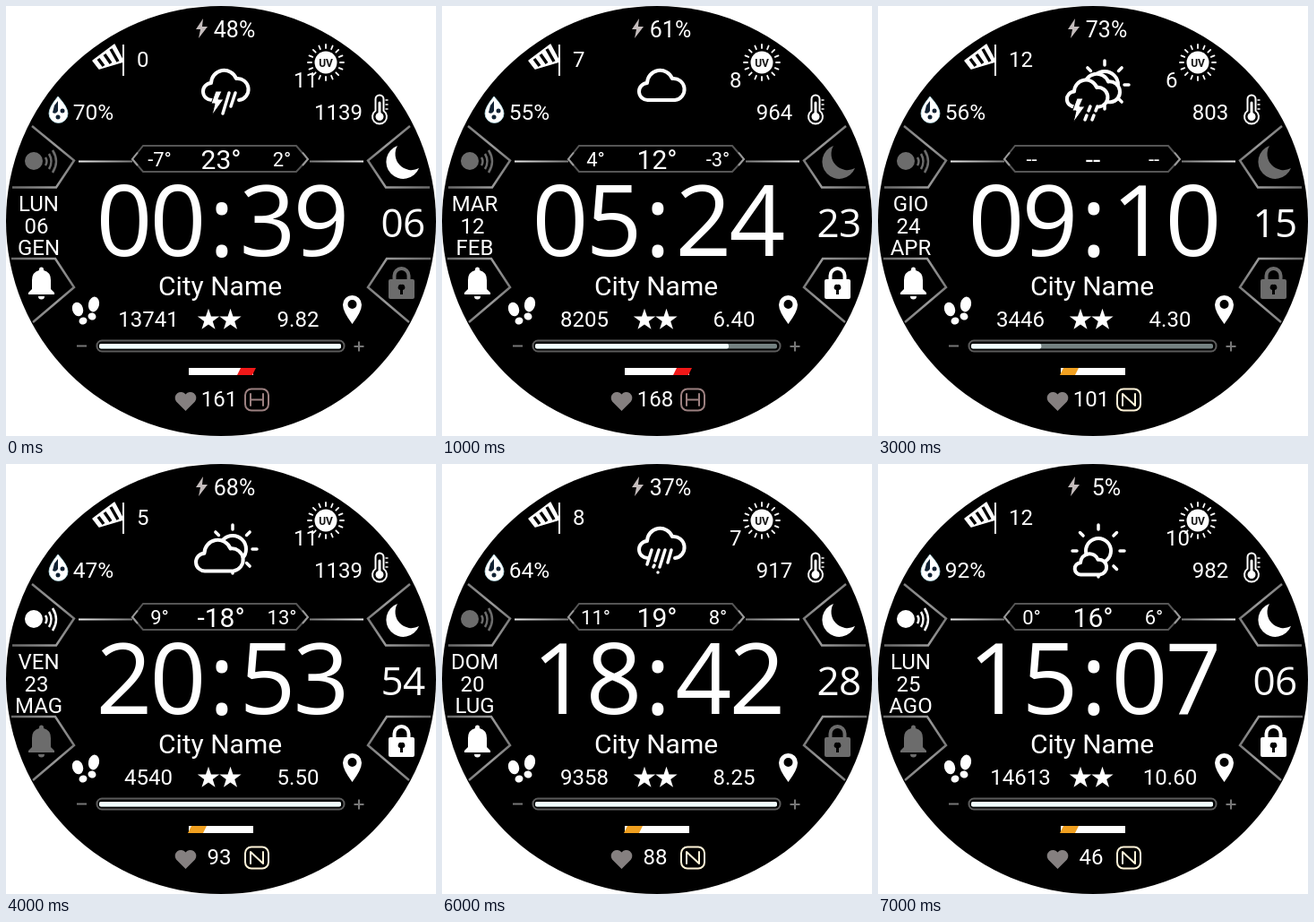
Write an HTML page that moves like this. It is 480 px wide and 480 px high and loops after 8000 ms.

```html
<!DOCTYPE html>
<html lang="it">
<head>
<meta charset="utf-8">
<title>Watch face</title>
<style>
html, body { margin: 0; width: 100%; height: 100%; overflow: hidden; background: #fff; }
svg { display: block; width: 100vw; height: 100vh; }
text { font-family: Roboto, sans-serif; font-size: 24px; fill: #fff; text-anchor: middle; }
.left { text-anchor: start; }
.time text { font-family: "Open Sans", "Noto Sans", sans-serif; font-size: 110px; }
.sec { font-family: "Open Sans", "Noto Sans", sans-serif; font-size: 44px; letter-spacing: -.7px; }
.line { fill: none; stroke: #fff; stroke-linecap: round; stroke-linejoin: round; }
.sky { stroke-width: 4; }
.state { visibility: hidden; animation: show 8s step-end infinite; }
@keyframes show { 0% { visibility: visible; } 12.5%, 100% { visibility: hidden; } }
</style>
</head>
<body>
<svg viewBox="0 0 480 480">
  <defs>
    <linearGradient id="edge" gradientUnits="userSpaceOnUse" x1="5" y1="0" x2="78" y2="0">
      <stop stop-color="#666"/><stop offset=".7" stop-color="#999"/><stop offset="1" stop-color="#777"/>
    </linearGradient>
    <linearGradient id="rail" gradientUnits="userSpaceOnUse" x1="80" y1="0" x2="142" y2="0">
      <stop stop-color="#eee"/><stop offset="1" stop-color="#777"/>
    </linearGradient>
    <g id="side" fill="none" stroke="url(#edge)" stroke-width="2.5">
      <path d="M29 134L76 172.500L56 202.500H7M6 282H55L76 314L30 353"/>
      <path d="M81 173.500H141" stroke="url(#rail)" stroke-width="2"/>
    </g>
    <path id="moon" d="M437 156A19 19 0 1 0 461 181A18 18 0 0 1 437 156Z"/>
    <g id="bell">
      <path d="M25 322V320L29 316V306Q29 297 37 295V294A2.500 2.500 0 0 1 42 294V295Q50 297 50 306V316L54 320V322Z"/>
      <path d="M36 324H43A3.500 3.500 0 0 1 36 324Z"/>
    </g>
    <g id="lock">
      <path d="M433.500 307V301A8 8 0 0 1 449.500 301V307" fill="none" stroke="currentColor" stroke-width="4"/>
      <rect x="427" y="305" width="29" height="22" rx="2"/>
      <path d="M441.500 311A3 3 0 0 1 443 317V322H440V317A3 3 0 0 1 441.500 311Z" fill="#000"/>
    </g>
    <g id="link">
      <circle cx="31" cy="173" r="10"/>
      <path d="M44 169Q47 173.500 44 178M48 165Q53 173.500 48 182M52 161Q60 173.500 52 186" fill="none" stroke="currentColor" stroke-width="2.500"/>
    </g>
  </defs>

  <circle cx="240" cy="240" r="240"/>
  <use href="#side"/>
  <use href="#side" transform="matrix(-1 0 0 1 480 0)"/>
  <path d="M141 171L153 156H324L337 171L324 185H153Z" fill="none" stroke="#555" stroke-width="2"/>
  <path d="M147 163.500L141 171L147 178M331 163.500L337 171L331 178" fill="none" stroke="#999" stroke-width="2"/>

  <path d="M220 14L212 26H217L215 36L225 23H219Z" fill="#c4bcbc"/>

  <g id="windsock">
    <path d="M97 61L121 43L131 62L104 70Z" fill="#fff"/>
    <path d="M103 59L109 67M110 54L117 64M117 48L125 62" stroke="#000" stroke-width="3.500"/>
    <path d="M97 61L121 43L131 62L104 70Z" class="line" stroke-width="1.500"/>
    <path d="M131 43V78" stroke="#fff" stroke-width="2"/>
  </g>

  <g id="uv">
    <circle cx="357" cy="63" r="12.500" fill="#fff"/>
    <text x="357" y="67.500" style="font-size:12px;font-weight:700;fill:#111">UV</text>
  </g>

  <g id="drop">
    <path d="M58 101Q69 113 69 120A10.500 10.500 0 0 1 48 120Q48 113 58 101Z" fill="#fff" stroke="#bfeaf4" stroke-width=".8"/>
    <path d="M54 111L58 106V117A4 4 0 0 1 52 119Z" fill="#123"/>
    <circle cx="63" cy="117" r="2.500" fill="#123"/>
    <circle cx="58" cy="124" r="2.500" fill="#123"/>
  </g>

  <g id="thermometer" class="line" stroke-width="2">
    <path d="M412.500 117V104A4.500 4.500 0 0 1 421.500 104V117A8 8 0 1 1 412.500 117Z"/>
    <path d="M417 108V122" stroke-width="3"/>
    <circle cx="417" cy="123.500" r="3.500" fill="#fff"/>
    <path d="M424 105H426M424 110H426M424 115H426" stroke-width="1.500"/>
  </g>

  <text x="239" y="323" style="font-size:30px">City Name</text>

  <g id="steps" fill="#fff">
    <ellipse cx="80" cy="338.500" rx="6" ry="8" transform="rotate(-18 80 338.500)"/>
    <ellipse cx="86" cy="351.500" rx="4.500" ry="4" transform="rotate(-18 86 351.500)"/>
    <ellipse cx="98" cy="333" rx="6" ry="8.500" transform="rotate(12 98 333)"/>
    <ellipse cx="96" cy="346.500" rx="4.500" ry="4" transform="rotate(12 96 346.500)"/>
  </g>
  <g id="stars" fill="#fff"></g>
  <path d="M386.500 355Q376 341 376 333.500A10.500 10.500 0 0 1 397 333.500Q397 341 386.500 355ZM386.500 328A5 5 0 1 0 386.500 338A5 5 0 1 0 386.500 328Z" fill="#fff" fill-rule="evenodd"/>

  <rect x="101.500" y="373.500" width="276" height="12" rx="5.500" fill="#000" stroke="#5c5c5c" stroke-width="2"/>
  <rect x="104" y="377" width="270" height="5.500" rx="2" fill="#758282"/>
  <path d="M79 379.500H90M388.500 380H399.500M394 374.500V385.500" stroke="#777" stroke-width="2"/>

  <rect x="204" y="404" width="72" height="8" fill="#fff"/>
  <path d="M200.500 452L190 441.500A6.500 6.500 0 0 1 200.500 433.500A6.500 6.500 0 0 1 211 441.500Z" fill="#858080"/>
  <g id="states"></g>
</svg>
<script>
const DIM = '#6c6c6c';
const $ = id => document.getElementById(id);

// day, time, sec, battery, wind, uv, humidity, altitude, temps, steps, distance, bar, zone, pulse, sky, lit icons
const states = [
  ['LUN 06 GEN', '00:39', '06', 48, 0, 11, 70, 1139, '-7° 23° 2°', 13741, '9.82', 1, 'H', 161, 'storm', 'bell moon'],
  ['MAR 12 FEB', '05:24', '23', 61, 7, 8, 55, 964, '4° 12° -3°', 8205, '6.40', .8, 'H', 168, 'cloud', 'bell lock'],
  ['MER 19 MAR', '10:11', '03', 26, 9, 10, 48, 1179, '-16° -5° -11°', 4627, '12.10', .43, 'H', 174, 'rain', 'bell lock'],
  ['GIO 24 APR', '09:10', '15', 73, 12, 6, 56, 803, '-- -- --', 3446, '4.30', .29, 'N', 101, 'sunStorm', 'bell'],
  ['VEN 23 MAG', '20:53', '54', 68, 5, 11, 47, 1139, '9° -18° 13°', 4540, '5.50', 1, 'N', 93, 'sunCloud', 'link moon lock'],
  ['SAB 14 GIU', '22:26', '35', 46, 4, 9, 81, 802, '-19° 26° -10°', 14816, '7.12', 1, 'M', 136, 'drop', 'bell'],
  ['DOM 20 LUG', '18:42', '28', 37, 8, 7, 64, 917, '11° 19° 8°', 9358, '8.25', 1, 'N', 88, 'rain', 'bell moon'],
  ['LUN 25 AGO', '15:07', '06', 5, 12, 10, 92, 982, '0° 16° 6°', 14613, '10.60', 1, 'N', 46, 'sun', 'link moon lock']
];

const zones = {
  H: [259, '#f01818', '#9c8080', 'M273 433V446M287 433V446M273 439.500H287'],
  N: [204, '#f0a020', '#fff4d8', 'M273 446V433L287 446V433'],
  M: [230, '#28c828', '#f2fff2', 'M272 446V434L279.500 443L287 434V446']
};

const text = (x, y, s, size = 24, cls = '') =>
  `<text x="${x}" y="${y}" class="${cls}" style="font-size:${size}px">${s}</text>`;

const line = (d, cls = 'line sky', extra = '') => `<path d="${d}" class="${cls}" ${extra}/>`;

function rays(x, y, r1, r2, count, width) {
  let d = '';
  for (let i = 0; i < count; i++) {
    const a = i * 2 * Math.PI / count, c = Math.cos(a), s = Math.sin(a);
    d += `M${x + r1 * c} ${y + r1 * s}L${x + r2 * c} ${y + r2 * s}`;
  }
  return line(d, 'line', `stroke-width="${width}"`);
}

const cloud = (x, y, k = 1, open = false) =>
  `<path class="line" transform="translate(${x} ${y}) scale(${k})" style="fill:#000;stroke-width:${4 / k}"
    d="M11 35A9.500 9.500 0 0 1 10 16A14.500 14.500 0 0 1 38 11A12 12 0 0 1 41 35${open ? '' : 'Z'}"/>`;

const sun = (x, y, r, far) =>
  `<circle cx="${x}" cy="${y}" r="${r}" class="line sky"/>` + rays(x, y, far - 5, far, 8, 3.5);

const bolt = (x, y) =>
  `<path d="M${x + 5} ${y}H${x + 12}L${x + 8} ${y + 9}H${x + 14}L${x + 1} ${y + 27}L${x + 4} ${y + 14}H${x}Z" fill="#fff" stroke="#000"/>`;

const sky = {
  cloud: () => cloud(219, 70),
  storm: () => cloud(219, 70, 1, true) + bolt(229, 95) + line('M249 97L242 120M256 97L251 112', 'line', 'stroke-width="3.500"'),
  rain: () => cloud(219, 70, 1, true) +
    line('M234 96L229 112M242 96L238 108M237 113L236 115M249 96L243 115M256 96L252 110M241 121V121', 'line', 'stroke-width="3.500"'),
  sunStorm: () => sun(253, 88, 15, 27) + cloud(221, 74, .95) + cloud(210, 81, .9, true) + bolt(217, 103) +
    line('M237 112L235 117M245 112L243 117M233 122L231 127M241 122L239 127', 'line', 'stroke-width="3.500"'),
  sunCloud: () => sun(253, 95, 15, 27) + cloud(211, 83, 1.04),
  drop: () => '<path d="M245 78Q259 94 259 101A14 13 0 0 1 231 101Q231 94 245 78Z" fill="#f4f0f0"/>',
  sun: () => sun(246, 97, 14, 29) + cloud(219, 99, .7)
};

const icon = (id, lit) => {
  const c = lit.includes(id) ? '#fff' : DIM;
  return `<use href="#${id}" fill="${c}" color="${c}"/>`;
};

function draw([day, time, sec, batt, wind, uv, hum, alt, temps, steps, dist, bar, zone, pulse, weather, lit], i) {
  const [low, now, high] = temps.split(' ');
  const [zx, zoneFill, zoneLine, letter] = zones[zone];
  const slots = [132, 192, 241, 292, 352];
  return `<g class="state" style="animation-delay:${i ? i - 8 : 0}s">` +
    text(255, 35, batt + '%', 25) +
    text(146, 68, wind, 24, 'left') +
    text(321, 91, uv, 24, 'left') +
    text(97.5, 126.5, hum + '%', 24.5) +
    text(371, 126.5, alt) +
    text(171.5, 178.5, low, 22) + text(240, 182, now, 30) + text(308, 178.5, high, 22) +
    day.split(' ').map((s, n) => text(n == 1 ? 34 : 36.5, 229 + n * 24.5, s)).join('') +
    `<g class="time">${[...time].map((c, n) => `<text x="${slots[n]}" y="278.500">${c}</text>`).join('')}</g>` +
    `<text x="443" y="258" class="sec">${sec}</text>` +
    text(159, 357.5, steps) + text(326, 357.5, dist) + text(238, 447, pulse) +
    `<rect x="104" y="377" width="${270 * bar}" height="5.500" rx="2" fill="#f2ffff"/>` +
    `<path d="M${zx + 3} 404H${zx + 20}L${zx + 16} 412H${zx - 1}Z" fill="${zoneFill}"/>` +
    `<g class="line" style="stroke:${zoneLine}" stroke-width="2"><rect x="267" y="427.500" width="26" height="24" rx="7"/>${`<path d="${letter}"/>`}</g>` +
    ['link', 'bell', 'moon', 'lock'].map(id => icon(id, lit)).join('') +
    sky[weather]() + '</g>';
}

function star(x, y) {
  const pts = Array.from({ length: 10 }, (_, n) => {
    const r = n % 2 ? 5 : 12.8, a = n * Math.PI / 5;
    return [x + r * Math.sin(a), y - r * Math.cos(a)];
  });
  return `<polygon points="${pts.join(' ')}"/>`;
}

$('uv').insertAdjacentHTML('beforeend', rays(357, 63, 16, 20, 16, 1.8));
$('stars').innerHTML = star(226, 350.5) + star(250.5, 350.5);
$('states').innerHTML = states.map(draw).join('');
</script>
</body>
</html>
```
